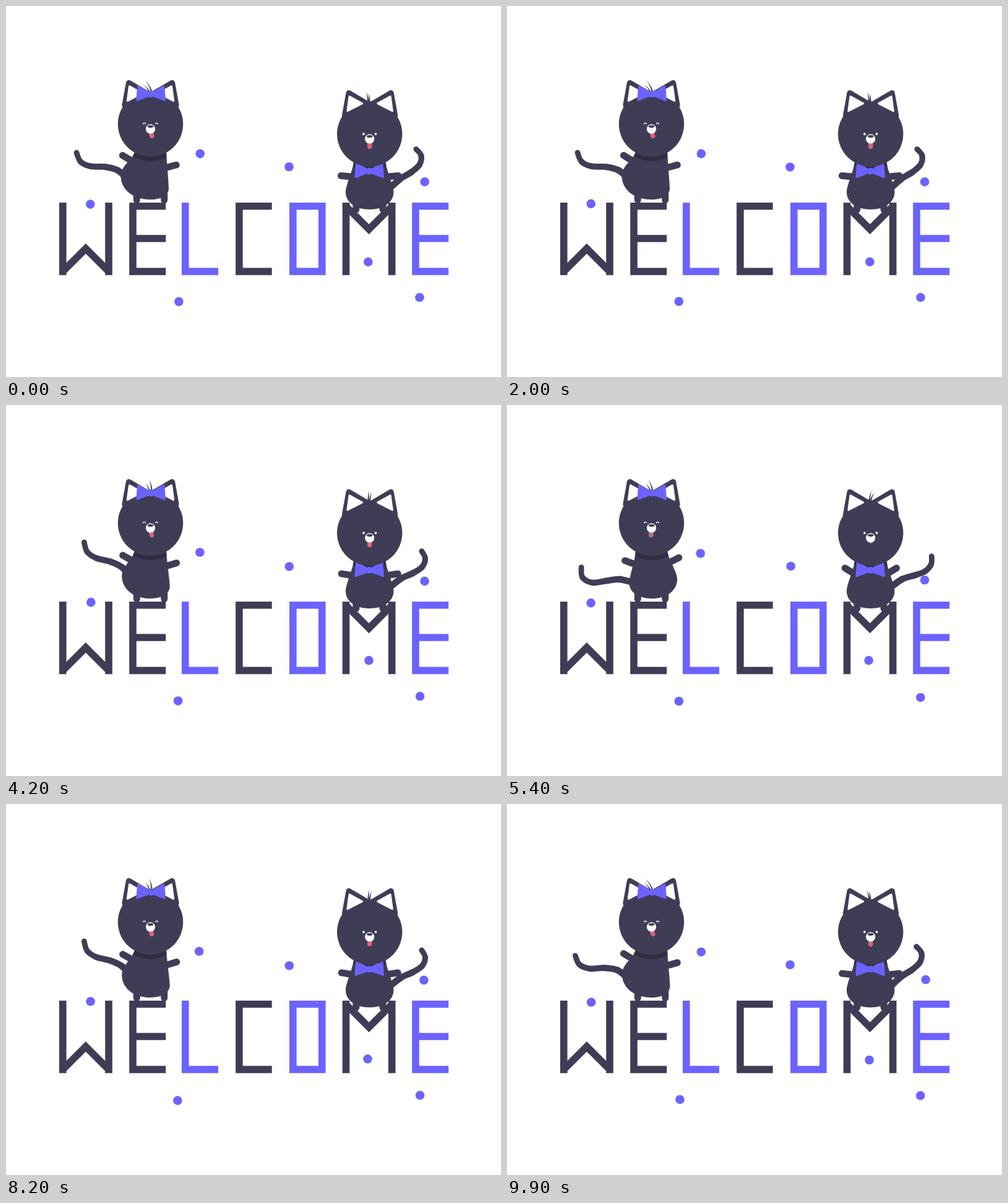
Animation of 800x600 px, one loop 10 s. Source, as an HTML page with a canvas:

```html
<!DOCTYPE html>
<html lang="en">
<head>
<meta charset="utf-8">
<title>Welcome</title>
<style>
html, body { margin: 0; width: 100%; height: 100%; overflow: hidden; background: #fff; }
canvas { display: block; }
</style>
</head>
<body>
<canvas id="stage" width="800" height="600"></canvas>
<script>
const ctx = document.getElementById('stage').getContext('2d');
const DARK = '#3f3d56', SHADE = '#2f2e41', VIOLET = '#6c63ff', WHITE = '#fff';
const LOOP = 10000, SWAY = 2000, STEP = 100;

const lerp = (a, b, k) => a + (b - a) * k;
const mix = (a, b, k) => a.map((v, i) => lerp(v, b[i], k));
// Swing between -1 and 1 that is highest at the given time
const wave = (t, peak) => Math.cos((t - peak) / SWAY * Math.PI * 2);

function disc(x, y, rx, color, ry = rx) {
  ctx.fillStyle = color;
  ctx.beginPath();
  ctx.ellipse(x, y, rx, ry, 0, 0, Math.PI * 2);
  ctx.fill();
}

function pen(color, width, cap = 'round', join = 'round') {
  ctx.strokeStyle = color;
  ctx.lineWidth = width;
  ctx.lineCap = cap;
  ctx.lineJoin = join;
}

function line(points) {
  ctx.beginPath();
  for (let i = 0; i < points.length; i += 2) ctx.lineTo(points[i], points[i + 1]);
  ctx.stroke();
}

function limb(points) {
  pen(DARK, 11);
  line(points);
}

function triangle(points, color, width) {
  pen(color, width);
  ctx.fillStyle = color;
  ctx.beginPath();
  for (const [x, y] of points) ctx.lineTo(x, y);
  ctx.closePath();
  ctx.fill();
  ctx.stroke();
}

// Chain of joints; angle(i) is the rise of a joint in degrees, side its direction
function tail(x, y, side, lengths, angle) {
  const pts = [[x, y]];
  lengths.forEach((len, i) => {
    const a = angle(i) * Math.PI / 180;
    x += side * len * Math.cos(a);
    y -= len * Math.sin(a);
    pts.push([x, y]);
  });
  const n = pts.length - 1;
  const pt = i => pts[Math.max(0, Math.min(n, i))];
  for (let i = 0; i < n; i++) {
    const [a, b, c, d] = [pt(i - 1), pt(i), pt(i + 1), pt(i + 2)];
    pen(DARK, lerp(10.8, 8.8, i / (n - 1)));
    ctx.beginPath();
    ctx.moveTo(...b);
    ctx.bezierCurveTo(
      b[0] + (c[0] - a[0]) / 6, b[1] + (c[1] - a[1]) / 6,
      c[0] - (d[0] - b[0]) / 6, c[1] - (d[1] - b[1]) / 6, ...c);
    ctx.stroke();
  }
}

// Pear-shaped body; left and right say how far each flank bulges (0 to 1)
function body(x, top, bottom, left, right) {
  ctx.fillStyle = DARK;
  ctx.beginPath();
  for (const [s, k] of [[-1, left], [1, right]]) {
    const w = lerp(29.5, 48, k), y = bottom - lerp(18, 38, k);
    ctx.moveTo(x, top);
    ctx.lineTo(x + s * 25.5, top);
    ctx.bezierCurveTo(
      x + s * lerp(26.5, 30, k * k), top + lerp(18, 14, k),
      x + s * w, y - lerp(9, 17, k * k), x + s * w, y);
    ctx.bezierCurveTo(
      x + s * w, y + lerp(11, 21, k),
      x + s * lerp(18, 29, k), bottom, x, bottom);
  }
  ctx.fill();
  ctx.save();
  ctx.clip();
  disc(x, top - 38, 53, SHADE);
  ctx.restore();
}

function hair(x, y, tx, ty) {
  const cx = lerp(x, tx, 0.25), cy = lerp(y, ty, 0.6);
  ctx.fillStyle = DARK;
  ctx.beginPath();
  ctx.moveTo(x - 1.4, y);
  ctx.quadraticCurveTo(cx - 0.9, cy, tx, ty);
  ctx.quadraticCurveTo(cx + 0.9, cy, x + 1.4, y);
  ctx.fill();
}

function ear(x, y, side) {
  const shape = (...p) => p.map(([dx, dy]) => [x + side * dx, y + dy]);
  triangle(shape([0, 0], [29, 17], [-6.5, 36]), DARK, 9.5);
  triangle(shape([0.9, 5.3], [21.3, 16.6], [-2.3, 28.7]), WHITE, 3);
}

function bow(x, y) {
  for (const s of [-1, 1]) {
    triangle([[x, y - 1], [x + s * 5, y - 3], [x + s * 20.5, y - 12],
      [x + s * 22, y + 9.5], [x + s * 5, y + 3], [x, y + 2]], VIOLET, 3.4);
  }
  disc(x, y, 5, VIOLET, 5.5);
}

function tongue(x, y, length, angle, color) {
  ctx.save();
  ctx.translate(x, y);
  ctx.rotate(angle);
  ctx.fillStyle = color;
  ctx.beginPath();
  ctx.roundRect(-3.7, 0, 7.4, length, [0, 0, 3.6, 3.6]);
  ctx.fill();
  ctx.restore();
}

function muzzle(x, y) {
  disc(x, y, 7.6, WHITE);
  disc(x, y - 4, 4.8, DARK, 2.1);
}

function rosy(t) {
  const c = mix([176, 112, 138], [226, 96, 126], (1 + wave(t, 200)) / 2);
  return `rgb(${c.map(Math.round)})`;
}

function letters() {
  const top = 323.8, mid = 376, low = 429.4, foot = 435.3;
  const draw = (color, ...paths) => {
    pen(color, 11.6, 'butt', 'miter');
    paths.forEach(line);
  };
  const E = (x, color) => draw(color,
    [x + 59, top, x + 5.8, top, x + 5.8, low, x + 59, low],
    [x + 5.8, mid, x + 59, mid]);
  // W and M: two posts with a chevron between them
  const posts = (x, y, tipY) => draw(DARK,
    [x, 318, x, foot], [x + 74.2, 318, x + 74.2, foot],
    [x, y, x + 37.1, tipY, x + 74.2, y]);
  posts(91.8, low, 392.3);
  E(199.2, DARK);
  draw(VIOLET, [289.8, 318, 289.8, low, 343, low]);
  draw(DARK, [429.7, top, 376.9, top, 376.9, low, 429.7, low]);
  draw(VIOLET, [458, top, 510.8, top, 510.8, low, 463.8, low, 463.8, top]);
  posts(549.5, 324, 361);
  E(656.2, VIOLET);
}

// Each dot drifts gently around its home
function dots(time) {
  const homes = [[136.3, 319.6], [313, 239], [458.5, 261], [676, 284],
    [585.5, 413], [669, 472], [278.4, 478.8]];
  const turn = time / LOOP * Math.PI * 2;
  homes.forEach(([x, y], i) => {
    const dx = Math.sin(turn * (3 + i % 3) + i * 2.4);
    const dy = Math.cos(turn * (4 + i % 2) + i * 1.7);
    disc(x + dx, y + dy, 7.3, VIOLET);
  });
}

function girl(t) {
  const u = (1 - wave(t, 0)) / 2, x = 233.5;
  const rest = [30, 12, 8, 38, 84];
  tail(203 - 10.5 * wave(t, 1800), 281 + 5 * wave(t, 1300), -1, [19, 21, 23, 18, 16],
    i => rest[i] + 19 * wave(t, 300 + 150 * i));
  limb(mix([188.3, 241.5, 212, 256], [191.7, 257, 215, 262.5], u));
  limb(mix([275.3, 257, 253, 263], [279.2, 241.5, 256, 256], u));
  for (const leg of [211.3, 255.7]) limb([leg, 304, leg, 313.5]);
  body(x, 236, 313, 1 - u, u);
  const lean = wave(t, 750);
  hair(236, 142, 233.6 + 11.9 * lean, 120.5);
  hair(233, 142, 226 + 7 * lean, 126.5);
  disc(x, 191, 52.7, DARK);
  ear(198.6, 124.6, 1);
  ear(268.4, 124.6, -1);
  bow(234.2, 142.5);
  pen(WHITE, 1.4);
  for (const dx of [-10, 10]) {
    ctx.beginPath();
    ctx.arc(x + dx, 191, 1.9, Math.PI * 1.05, Math.PI * 1.95);
    ctx.stroke();
  }
  tongue(x, 202, 12.3, -0.28 * wave(t, 0), rosy(t));
  muzzle(x, 198.8);
}

function boy(t) {
  const c = wave(t, 0), u = (1 - c) / 2, x = 587.7;
  const rest = [34, 16, 20, 50, 90];
  tail(620, 295, 1, [23, 21, 18, 15, 13],
    i => rest[i] + (9 + 7.5 * i) * wave(t, 1850 + 20 * i));
  limb(mix([541.4, 274.5, 563, 276.5], [548.7, 258, 565, 274], u));
  limb(mix([634, 274.5, 612, 276.5], [627, 258, 611, 274], u));
  for (const leg of [565.8, 609]) limb([leg, 318, leg, 329]);
  body(x, 251, 329, 0.5, 0.5);
  bow(587.2, 267);
  const lean = wave(t, 850);
  hair(587.5, 157, 595.5 + 10 * lean, 141);
  hair(585.5, 157, 590.5 + 9 * lean, 139);
  disc(x, 207, 52.7, DARK);
  ear(554.2, 141, 1);
  ear(622, 141, -1);
  for (const dx of [-9.8, 9.8]) disc(x + dx, 207, 1.9, WHITE);
  tongue(x, 217, 8.3 + 5.7 * c, 0, rosy(t));
  muzzle(x, 214.8);
}

function draw(time) {
  ctx.fillStyle = WHITE;
  ctx.fillRect(0, 0, 800, 600);
  dots(time);
  letters();
  girl(time % SWAY);
  boy(time % SWAY);
}

const start = performance.now();
function tick() {
  const time = (performance.now() - start) % LOOP;
  draw(Math.floor(time / STEP) * STEP);
  requestAnimationFrame(tick);
}
tick();
</script>
</body>
</html>
```
